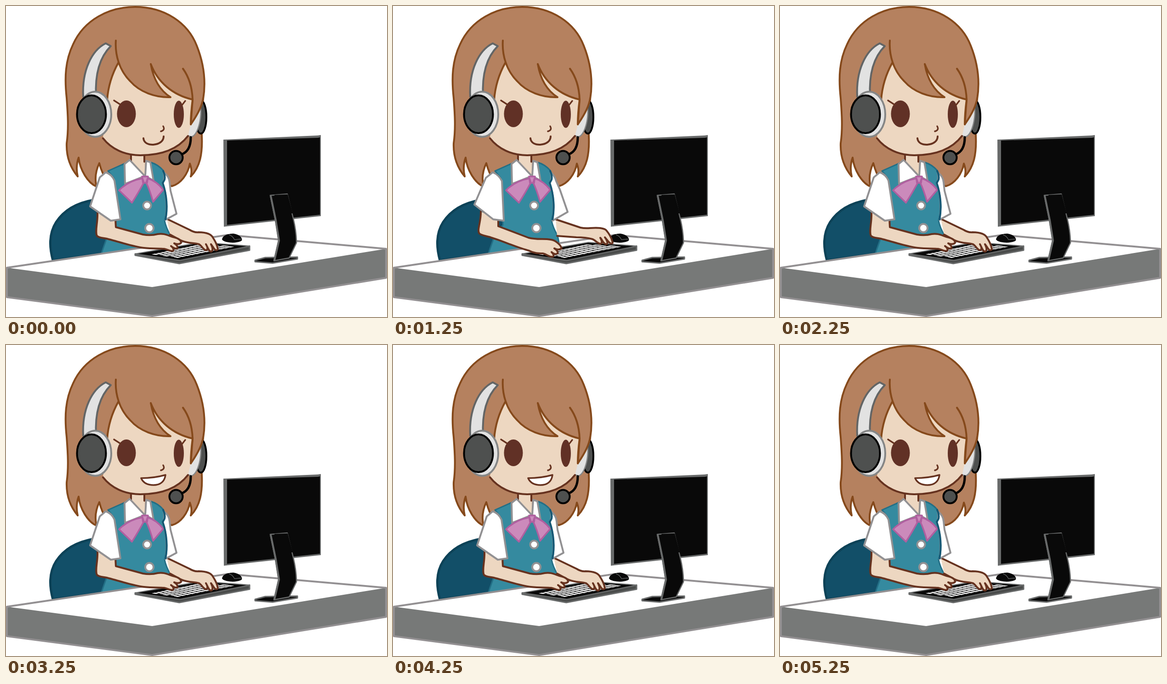
An HTML page for the animation above (5500 ms loop, 829 by 675 pixels).

```html
<!DOCTYPE html>
<html lang="en">
<head>
<meta charset="utf-8">
<title>Operator at a desk</title>
<style>
html, body { margin: 0; width: 100%; height: 100%; overflow: hidden; background: #fff; }
svg { display: block; width: 829px; height: 675px; }
.hair { fill: #b5815f; stroke: #85491b; stroke-width: 4; }
.strand { fill: none; stroke: #85491b; stroke-width: 4; }
.skin { fill: #edd7c1; }
.ink { fill: none; stroke: #66321f; stroke-width: 4; }
.arm { fill: #edd7c1; stroke: #66321f; stroke-width: 4; }
.cloth { fill: #fff; stroke: #929193; stroke-width: 4; }
.vest { fill: #358a9f; stroke: #236f86; stroke-width: 3; }
.side { fill: none; stroke: #135875; stroke-width: 4; }
.bow { fill: #cb8abb; stroke: #b05fa0; stroke-width: 3.5; }
.edge { fill: none; stroke: #939092; stroke-width: 4; }
.black { fill: #090909; stroke: #686a6a; stroke-width: 3; }
.shell { fill: #e2e2e2; stroke: #858686; stroke-width: 4; }
.pad { fill: #4e504f; stroke: #000; stroke-width: 4; }
</style>
</head>
<body>
<svg viewBox="0 0 829 675" stroke-linecap="round" stroke-linejoin="round">
  <!-- chair -->
  <path d="M102 552C94 523 93 494 109 469C127 442 155 427 190 421L250 450L207 538Z" fill="#124f68" stroke="#0d4257" stroke-width="5"/>

  <!-- back hair and far earpiece -->
  <path class="hair" d="M211 364Q206 353 203 341C195 358 193 376 197 392C178 384 161 356 158 329C153 343 153 357 156 370C140 351 131 326 132 298C137 264 134 228 132 200C127 155 129 118 146 83C170 30 224 2 281 2C346 2 396 37 415 86C431 126 435 166 429 202C425 235 425 255 426 281C428 321 422 350 402 370C405 360 403 350 400 342C396 365 380 386 361 391L300 374"/>
  <ellipse class="pad" cx="424" cy="241" rx="12" ry="36"/>
  <path class="shell" d="M411 215C418 210 423 213 424 228C424 254 415 282 403 284L394 281Z" style="stroke-width:2.5"/>
  <path class="hair" d="M429 200C427 216 416 237 402 257L406 203"/>

  <!-- torso -->
  <path class="skin" d="M272 318V350L303 368L302 318Z"/>
  <path class="ink" d="M272 322V338M301 322V338"/>
  <path class="vest" d="M222 358L260 341L302 369L314 339Q331 344 342 357Q347 369 345 377L341 384C350 410 352 442 345 466Q348 481 358 498L362 518L206 541L218 507Q231 486 239 475V460L234 373Z"/>
  <path class="cloth" d="M258 343L269 334L302 369L259 386Z"/>
  <path class="cloth" d="M305 336L314 339L321 379L303 369Z"/>
  <path class="bow" d="M297 374Q265 380 246 400L274 427Q287 407 300 383ZM308 374Q328 380 342 399L320 425Q313 400 305 383ZM296 370H309L307 384H298Z"/>
  <g class="cloth"><circle cx="307" cy="433" r="8.5"/><circle cx="312" cy="482" r="9"/></g>

  <!-- desk -->
  <path fill="#fff" d="M2 568L482 497L827 527L318 610Z"/>
  <path fill="#777978" d="M2 568L318 610L827 527V590L318 673L2 632Z"/>
  <path class="edge" d="M2 568L482 497L827 527V590L318 673L2 632Z"/>

  <!-- keyboard and mouse -->
  <path class="black" style="fill:#4a4c4b" d="M281 538L378 552L530 521V530L377 559L281 541Z"/>
  <path class="black" style="stroke-width:2" d="M281 538L425 513L530 521L378 552Z"/>
  <path id="keys" fill="#fff"/>
  <path fill="#090909" d="M470 507C471 497 485 494 495 494C508 496 515 503 513 509C505 516 476 515 470 507Z"/>
  <path fill="none" stroke="#5b5d5d" stroke-width="1.5" d="M486 497Q493 499 497 507L511 506"/>

  <!-- monitor -->
  <path fill="#686a6a" d="M473 290L678 281L685 280V456L474 479Z"/>
  <path fill="#090909" d="M481 292L679 286L683 285V453L481 475Z"/>
  <path class="black" d="M542 552L564 546L634 545V549L580 558L542 555Z"/>
  <path class="black" style="stroke-width:2.5" d="M575 411L612 408L625 461Q632 490 632 514L616 547L583 553L593 509L586 465Z"/>
  <path fill="#090909" d="M584 410L613 409L624 450L593 453Z"/>
  <path fill="none" stroke="#686a6a" stroke-width="4" d="M576 412L587 465L594 509L584 552"/>

  <!-- hands together -->
  <g id="near">
    <path class="arm" d="M350 462L400 486Q409 492 419 491C435 491 447 495 451 504Q459 516 461 528Q457 534 451 524L446 517Q452 529 447 533C441 534 439 523 435 517Q441 527 436 530C430 531 426 520 420 517C407 514 392 515 379 508L357 496"/>
    <path class="arm" d="M199 449C200 470 193 490 198 499C203 504 213 503 223 506C250 513 276 522 300 525C319 527 334 526 344 527C352 528 358 534 364 531Q366 526 359 521Q368 528 373 526Q375 521 366 515Q376 519 381 514C381 507 371 503 362 501C350 497 343 493 330 495Q315 499 298 496L239 480L238 462"/>
    <path class="cloth" d="M217 361Q230 365 236 379L249 463L228 466L183 435L204 372Z"/>
    <path class="cloth" d="M343 361Q355 369 356 383L358 401L371 451L347 464C351 440 350 410 341 385Q347 374 343 361Z"/>
  </g>

  <!-- hands apart -->
  <g id="apart">
    <path class="arm" d="M354 463L408 481Q417 483 429 482C445 481 460 481 465 488Q475 500 478 514Q474 519 466 508L461 502Q469 514 465 517C458 518 456 508 451 503Q457 514 452 516C445 516 440 508 434 506C423 503 411 502 399 502L357 499"/>
    <path class="arm" d="M191 446C192 467 182 487 188 494C194 499 205 499 215 503C244 512 271 525 296 531C307 537 317 537 326 537C336 539 340 546 348 544Q352 541 345 534Q353 541 358 537Q360 532 351 526Q360 531 367 526C365 519 354 508 343 507C327 504 315 508 295 503L229 478V464"/>
    <path class="cloth" d="M217 361Q230 366 237 380L241 466L218 463L177 431L202 373Z"/>
    <path class="cloth" d="M343 361Q352 368 355 380L363 398L380 447L347 466C351 440 350 410 341 385Q347 374 343 361Z"/>
  </g>
  <path class="side" d="M342 358Q347 369 345 377L341 384C350 410 352 440 347 463"/>

  <!-- face and bangs -->
  <path class="skin" d="M245 122C261 170 309 199 358 198C333 182 320 155 315 126C330 165 362 193 406 203Q402 235 402 257L396 283C373 311 340 324 292 324C255 322 226 308 211 286L220 205C222 174 232 145 245 122Z"/>
  <path class="ink" d="M211 287C229 310 258 324 292 324C338 324 373 312 396 282"/>
  <path class="strand" d="M239 75C237 105 246 139 270 163C291 187 325 199 358 198C333 182 320 155 315 126C330 165 362 193 406 203M385 136C398 154 405 174 406 203Q402 235 402 257M245 122C232 145 222 174 220 205"/>
  <g fill="#613126"><ellipse cx="262" cy="234" rx="20.5" ry="29"/><ellipse cx="376" cy="235" rx="11" ry="29.5"/></g>
  <path class="ink" style="stroke-width:3.4" d="M235 205L249 214M390 206L383 215M342 261C345 266 344 270 337 272"/>
  <path id="half" fill="#fff" stroke="#66321f" stroke-width="3" d="M299 287Q322 288 343 283C343 293 334 300 320 301C309 301 300 297 299 287Z"/>
  <path id="smile" class="ink" d="M299 287C300 297 309 301 320 301C334 300 343 293 343 283"/>
  <path id="open" fill="#fff" stroke="#66321f" stroke-width="3.6" d="M294 289Q322 289 347 282C345 297 335 304 321 304C307 304 298 298 294 289Z"/>

  <!-- headset -->
  <path class="shell" style="stroke:#636565" d="M217 81C187 96 165 139 168 197H196C193 145 205 110 228 87Z"/>
  <ellipse class="shell" cx="194" cy="235" rx="35" ry="49"/>
  <ellipse class="pad" cx="186" cy="235" rx="31.5" ry="41"/>
  <path fill="none" stroke="#000" stroke-width="5" d="M402 285C402 303 396 317 382 322"/>
  <circle class="pad" cx="370" cy="329" r="14.5"/>

  <!-- incoming call -->
  <path id="ring" fill="none" stroke="#090909" stroke-width="6" d="M484 172L543 137M490 194H572M484 216L543 250"/>
</svg>
<script>
const LOOP = 5500, STEP = 250;
const part = id => document.getElementById(id);
const show = (id, on) => part(id).setAttribute('visibility', on ? 'visible' : 'hidden');

// Staggered keys laid out on the slanted keyboard top.
function layKeys(cols, rows) {
  const at = (u, v) => {
    const x = 317 + 106 * u + 59 * v + 20 * u * v;
    const y = 539 - 22 * u + 8 * v - 3 * u * v;
    return x.toFixed(1) + ' ' + y.toFixed(1);
  };
  let d = '';
  for (let r = 0; r < rows; r++) {
    for (let c = 0; c < cols; c++) {
      const u = (c + (r % 2) * 0.4) / cols, v = r / rows;
      const u2 = u + 0.76 / cols, v2 = v + 0.82 / rows;
      d += `M${at(u, v)}L${at(u2, v)}L${at(u2, v2)}L${at(u, v2)}Z`;
    }
  }
  part('keys').setAttribute('d', d);
}

function draw(ms) {
  const n = Math.floor((ms % LOOP) / STEP);
  const odd = n % 2 === 1;
  const apart = (n < 6 && odd) || (n >= 16 && !odd);
  const talking = n >= 10;
  show('near', !apart);
  show('apart', apart);
  show('ring', n === 6 || n === 8);
  show('smile', !talking);
  show('half', talking && !odd);
  show('open', talking && odd);
}

layKeys(12, 5);
const start = performance.now();
function tick() {
  draw(performance.now() - start);
  requestAnimationFrame(tick);
}
draw(0);
requestAnimationFrame(tick);
</script>
</body>
</html>
```
